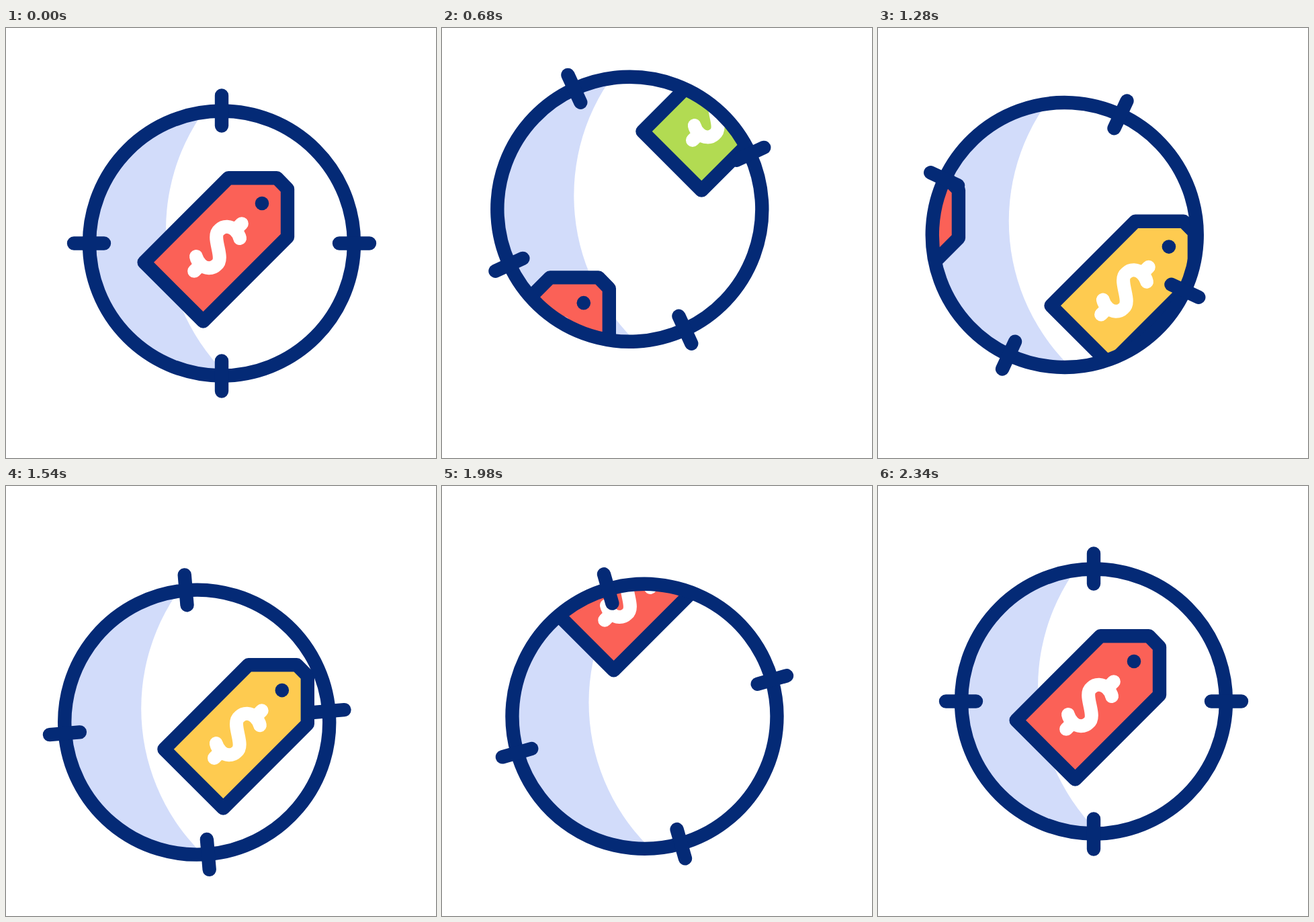
These frames come from a looping animation (640x640 px, 2.4 s). An HTML page:

```html
<!DOCTYPE html>
<html lang="en">
<head>
<meta charset="utf-8">
<title>Price target</title>
<style>
  html, body { margin: 0; width: 100%; height: 100%; overflow: hidden; background: #fff; }
  svg { display: block; width: 100vw; height: 100vh; }
  .line { fill: none; stroke: #042a76; stroke-width: 20.4; stroke-linecap: round; stroke-linejoin: round; }
  .cash { fill: none; stroke: #fff; stroke-width: 20; stroke-linecap: round; stroke-linejoin: round; }
</style>
</head>
<body>
<svg viewBox="0 0 640 640">
  <defs>
    <clipPath id="lens"><circle id="hole" r="197"/></clipPath>
    <g id="tag">
      <path d="M331 223.2H403L419 239.6V311L293.5 436.5L205.6 348.7Z" stroke="#042a76" stroke-width="20.4" stroke-linejoin="round"/>
      <circle cx="381" cy="261" r="10.3" fill="#042a76"/>
      <path class="cash" transform="translate(315.5 326.5) rotate(45)"
        d="M13.5-32.5C9-35.5 4-36 0-36C-9.5-36-17-29-17-20C-19-3 19 3 17 20C17 29 9.5 36 0 36C-4 36-9 35.5-13.5 32.5M0-50V-36M0 50V36"/>
    </g>
  </defs>
  <g clip-path="url(#lens)">
    <g id="shade">
      <circle r="197" fill="#d2dcfa"/>
      <circle cx="220" cy="-20.5" r="303" fill="#fff"/>
    </g>
    <use id="red" href="#tag" fill="#fb6157"/>
    <use id="green" href="#tag" fill="#b2db52"/>
    <use id="yellow" href="#tag" fill="#fecb50"/>
  </g>
  <g id="ring" class="line">
    <circle r="197"/>
    <path d="M0-220V-175M0 175V220M-220 0H-175M175 0H220"/>
  </g>
</svg>
<script>
const LOOP = 2400, SWAP = 1460;
const el = id => document.getElementById(id);
const [hole, shade, ring, red, green, yellow] =
  ["hole", "shade", "ring", "red", "green", "yellow"].map(el);

// keys: [time, ...values]
const lensKeys = [[97, 0, 0], [893, -50.5, -61.5], [1690, -35.4, 40.5], [2315, 0, 0]];
const turnKeys = [[97, 0], [660, -25], [1117, 25], [1270, 25], [1750, -25], [2318, 0]];
const tagKeys = [[100, 0, 0], [790, -182.4, 158.8], [SWAP, -324, -32]];
const lastKeys = [[SWAP, -112, -479], [2315, 0, 0]];

const ease = s => s * s * (3 - 2 * s);

function at(keys, t) {
  let i = 0;
  while (i < keys.length - 2 && t > keys[i + 1][0]) i++;
  const [t0, ...a] = keys[i], [t1, ...b] = keys[i + 1];
  const k = ease(Math.min(1, Math.max(0, (t - t0) / (t1 - t0))));
  return a.map((v, j) => v + (b[j] - v) * k);
}

function move(node, x, y, extra = "") {
  node.setAttribute("transform", `translate(${x.toFixed(3)} ${y.toFixed(3)})${extra}`);
}

function draw(t) {
  const [dx, dy] = at(lensKeys, t);
  const cx = 321 + dx, cy = 320.5 + dy;
  move(hole, cx, cy);
  move(shade, cx, cy);
  move(ring, cx, cy, ` rotate(${at(turnKeys, t)[0].toFixed(3)})`);

  const late = t >= SWAP;
  const [x, y] = at(tagKeys, t);
  const [lx, ly] = at(lastKeys, t);
  move(red, late ? lx : x, late ? ly : y);
  move(green, x + 263, y - 343);
  green.style.display = late ? "none" : "";
  move(yellow, x + 351 + lx + 112, y + 63 + ly + 479);
}

function tick() {
  draw(performance.now() % LOOP);
  requestAnimationFrame(tick);
}
tick();
</script>
</body>
</html>
```
